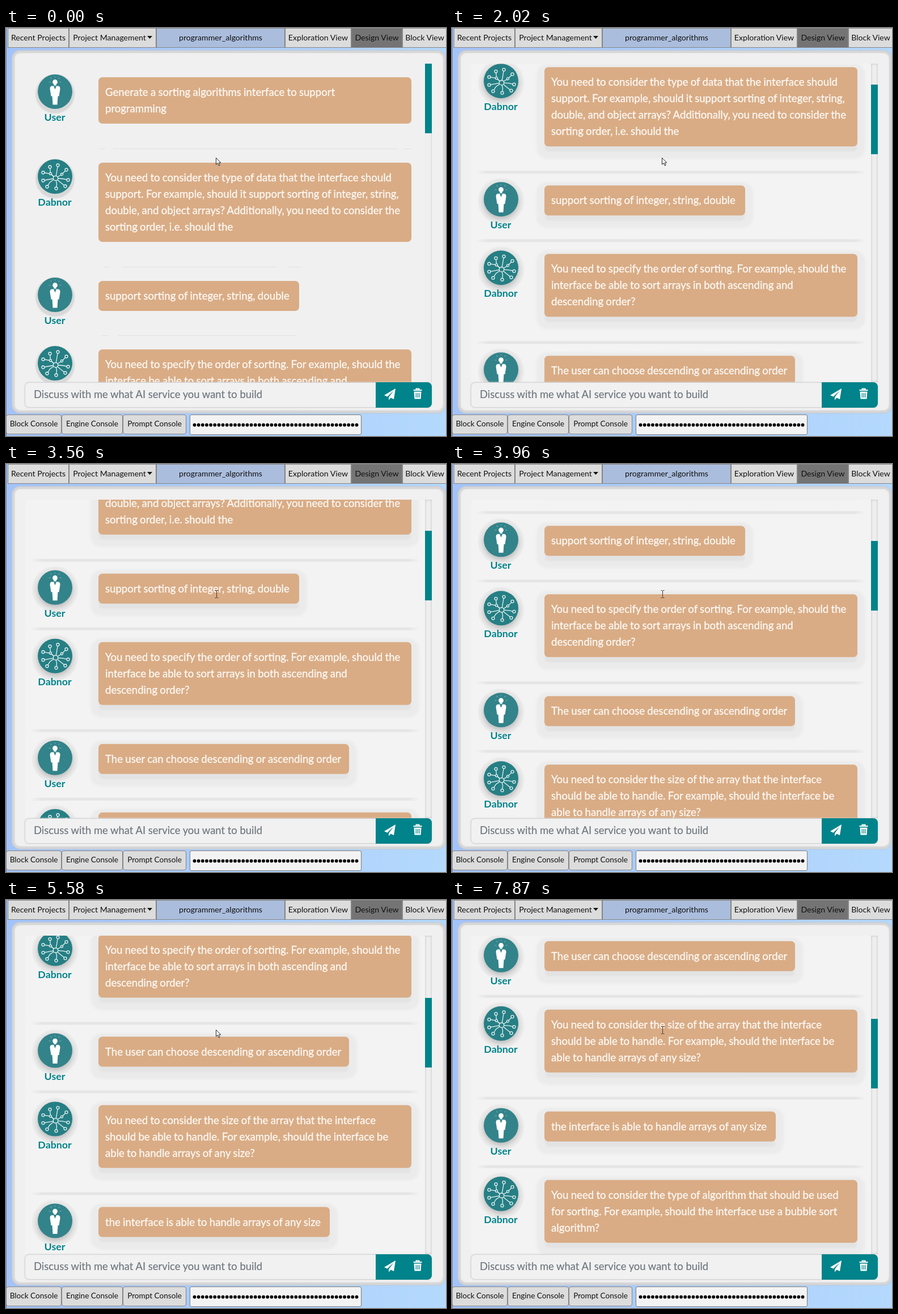
An HTML page for the animation above (8 s loop, 776 by 721 pixels).

```html
<!DOCTYPE html>
<html lang="en">
<head>
<meta charset="utf-8">
<title>Chat</title>
<style>
  html, body { margin: 0; width: 100%; height: 100%; overflow: hidden; }
  body { position: relative; background: linear-gradient(90deg, #a3c3f9, #b4d9fd); font-family: Lato, sans-serif; }
  div, svg { position: absolute; box-sizing: border-box; }
  #art { left: 0; top: 0; }
  .btn { border: 1px solid #858585; background: #dcdcdc; color: #111; text-align: center; white-space: pre; }
  .tab { top: 0; height: 35px; font-size: 14.1px; line-height: 31px; }
  .tool { top: 683px; height: 35px; border-radius: 4px; font-size: 13.6px; line-height: 30px; }
  #panel { left: 11px; top: 40px; width: 764px; height: 640px; border: 4px solid #d6d6d6; border-radius: 14px;
    background: #f0f0f0; box-shadow: 0 0 2px 1px #c4c8d0, inset 0 0 3px #dedede; }
  #view { left: 34px; top: 63px; width: 705px; height: 563px; overflow: hidden; background: #f3f3f3; }
  #list { left: -34px; top: -63px; width: 776px; }
  .bubble { left: 163px; padding: 12px; border-radius: 7px; background: #d9ac85; color: #fdf9f5; white-space: pre;
    font-size: 18.6px; line-height: 29.1px; word-spacing: -.5px; -webkit-text-stroke: .3px;
    box-shadow: 0 10px 3px -1px #e3e3e3, 0 8px 4px 14px #ebebeb; }
  .face { left: 55.5px; width: 61px; height: 61px; border-radius: 50%;
    box-shadow: 0 4px 8px 1px #bcbcbc, 0 3px 2px 10px #ebebeb; }
  .name { left: 36px; width: 100px; text-align: center; color: #00838a; font: 700 17.8px/28px Lato, sans-serif; }
  .rule { left: 42px; width: 688px; height: 5px; border-radius: 2px;
    background: linear-gradient(90deg, #f3f3f3, #e5e5e5 3%, #e5e5e5 97%, #f3f3f3); }
  #marks { left: 0; top: 0; display: none; }
  .flat #view { background: #f0f0f0; }
  .flat .bubble { box-shadow: none; }
  .flat .face { box-shadow: 0 4px 2px 4px #d8d8d8; }
  .flat .rule { display: none; }
  .flat #marks { display: block; }
  #track { left: 739px; top: 63px; width: 12px; height: 563px; background: #efefef; box-shadow: inset 0 0 4px #bdbdbd; }
  .flat #track { box-shadow: inset -1px 0 2px #d4d4d4; }
  #thumb { left: 0; width: 12px; height: 123px; background: #00838a; }
  #ask { left: 33px; top: 626px; width: 718px; height: 45px; border: 1px solid #cfd2d4; border-radius: 8px;
    background: #f1f1f1; box-shadow: 0 0 3px #d6d6d6; padding-left: 15px; color: #6c757d;
    font-size: 18.4px; line-height: 41px; white-space: pre; -webkit-text-stroke: .15px; }
  #send { left: 652px; top: 626px; width: 99px; height: 45px; border-radius: 0 8px 8px 0; background: #00838a; }
  #key { left: 324px; top: 683px; width: 303px; height: 36px; border: 1px solid #7c7c7c; border-radius: 3px; background: #f3f3f3; }
</style>
</head>
<body class="flat">
<div id="panel"></div>
<div id="view"><div id="list">
  <svg id="marks" width="776" height="640" fill="none" stroke="#e2e2e2">
    <path d="M164 213.5h12m12 0h502m11 0h14M171 422.5h13m20 0h273m19 0h24M168 543.5h13m16 0h315"/>
  </svg>
</div></div>
<div id="track"><div id="thumb"></div></div>
<div id="ask">Discuss with me what AI service you want to build</div>
<div id="send"></div>
<div id="key"></div>
<svg id="art" width="776" height="721">
  <path d="M.5 0V721" stroke="#72829f"/>
  <path d="M249 14h9l-4.500 5z" fill="#111"/>
  <path d="M687 637L667 649l5.500 2.500 11-10.500-8.500 11.500v5l3.500-4 5.500 2.500z" fill="#fff"/>
  <path d="M718.500 640h15M723.500 639.500v-2h5v2" fill="none" stroke="#fff" stroke-width="2"/>
  <path d="M719.500 642.500h13l-1 13h-11z" fill="#fff"/>
  <path d="M723.200 645v8M726 645v8M728.800 645v8" stroke="#00838a" stroke-width="1.200"/>
  <path d="M332.500 701.500H620" stroke="#000" stroke-width="5.800" stroke-linecap="round" stroke-dasharray="0 7.150"/>
  <path id="arrow" d="M370.500 229.500v11.700l2.700-2.500 2 4.500 1.900-.8-1.900-4.400h3.600z" fill="#fff" stroke="#111" stroke-width=".9"/>
  <path id="beam" d="M368.500 223.500h2.200l.8 .8 .8-.8h2.200M371.500 224v12M368.500 236.500h2.200l.8-.8 .8 .8h2.200" fill="none" stroke="#493a30"/>
</svg>
<script>
const $ = id => document.getElementById(id);
const WIDE = 551.5, NOTCH = 84.41, LINE = 29.1, GAP = 68.3;

function add(parent, cls, style, html) {
  const el = document.createElement('div');
  el.className = cls;
  Object.assign(el.style, style);
  el.innerHTML = html || '';
  parent.append(el);
  return el;
}

// Toolbars: left, width, label, fill
const tabs = [
  [3, 108, 'Recent Projects'], [111, 154, 'Project Management   '], [265, 227, 'programmer_algorithms', '#abbddd'],
  [492, 117, 'Exploration View'], [609, 90, 'Design View', '#747474'], [699, 79, 'Block View']
];
const tools = [[0, 98, 'Block Console'], [98, 108, 'Engine Console'], [206, 112, 'Prompt Console']];
const bar = (items, cls) => items.forEach(([left, width, label, background = '#dcdcdc']) =>
  add(document.body, 'btn ' + cls, { left: left + 'px', width: width + 'px', background }, label));
bar(tabs, 'tab');
bar(tools, 'tool');
document.body.append($('art'));

// Avatars
const svg = body => `<svg width="61" height="61" viewBox="-30.5 -30.5 61 61">${body}</svg>`;
const branches = [
  [[-8, -5], [-21, -7]], [[-8, -5], [-9, -17]], [[3, -8], [5, -20]], [[12, -4], [20, -12]],
  [[14, 4], [23, 6]], [[9, 10], [18, 17]], [[3, 13], [2, 21]], [[-9, 10], [-14, 18]], [[-10, 5], [-21, 7]]
];
const ring = ([x, y], r) => `<circle cx="${x}" cy="${y}" r="${r}"/>`;
const network = svg(`<g stroke="#e6f2f2" stroke-width="1.3" fill="#267f84">
  ${branches.map(([bend, tip]) => `<path d="M1 3L${bend}L${tip}" fill="none"/>` + ring(tip, 2.5)).join('')}
  ${ring([12, -4], 2)}${ring([-8, -5], 2)}${ring([1, 3], 4.2)}</g>`);
const person = svg(`<path d="M-8-17h-3M8-17h3M-6-23l-2-2M6-23l2-2M0-25v-2" stroke="#65a3a7" stroke-width="1.5"/>
  <g fill="#fff"><circle cy="-17" r="4.4"/><path d="M-2-14h4v3h-4z"/>
  <path d="M-5-10H5q4 0 4 5l-2 13h-2l-1 15h-8l-1-15h-2l-2-13q0-5 4-5z"/></g>
  <path d="M-2.500-10L0-4l2.500-6z" fill="#33838a"/>`);

// Conversation: bubble width, lines
const messages = [
  [WIDE, 'Generate a sorting algorithms interface to support', 'programming'],
  [WIDE, 'You need to consider the type of data that the interface should',
    'support. For example, should it support sorting of integer, string,',
    'double, and object arrays? Additionally, you need to consider the', 'sorting order, i.e. should the'],
  [353.5, 'support sorting of integer, string, double'],
  [WIDE, 'You need to specify the order of sorting. For example, should the',
    'interface be able to sort arrays in both ascending and', 'descending order?'],
  [441.5, 'The user can choose descending or ascending order'],
  [WIDE, 'You need to consider the size of the array that the interface',
    'should be able to handle. For example, should the interface be', 'able to handle arrays of any size?'],
  [407.5, 'the interface is able to handle arrays of any size'],
  [WIDE, 'You need to consider the type of algorithm that should be used',
    'for sorting. For example, should the interface use a bubble sort', 'algorithm?']
];
let y = 87.3;
messages.forEach(([width, ...lines], i) => {
  const bot = i % 2, height = 24 + LINE * lines.length;
  const at = dy => ({ top: y + dy + 'px' });
  if (i) add($('list'), 'rule', at(-26));
  add($('list'), 'face', { ...at(-5.6), background: bot ? '#267f84' : '#33838a' }, bot ? network : person);
  add($('list'), 'name', at(55.5), bot ? 'Dabnor' : 'User');
  add($('list'), 'bubble', { ...at(0), width: width + 'px', height: height + 'px' }, lines.join('\n'));
  y += height + GAP;
});

// Scroll position in wheel notches, held from each time on
const scroll = [
  [0, 0], [500, .75], [650, 1], [1500, 1.75], [1640, 2], [3010, 2.75], [3130, 3], [3840, 3.75], [3960, 4],
  [4360, 4.4], [4480, 4.9], [4600, 5], [5430, 5.75], [5580, 6], [6790, 6.815], [6910, 7], [7440, 7.75], [7590, 8]
];
const textCursor = [[1120, 2020], [3560, 4360], [7870, 8000]];

function draw(now) {
  const t = now % 8000;
  const offset = scroll.findLast(([start]) => start <= t)[1] * NOTCH;
  const overText = textCursor.some(([from, to]) => t >= from && t < to);
  document.body.classList.toggle('flat', t < 500);
  $('list').style.transform = `translateY(${-offset}px)`;
  $('thumb').style.top = offset * .217 + 'px';
  $('beam').style.display = overText ? '' : 'none';
  $('arrow').style.display = overText ? 'none' : '';
}

const began = performance.now();
function tick() {
  draw(performance.now() - began);
  requestAnimationFrame(tick);
}
tick();
</script>
</body>
</html>
```
